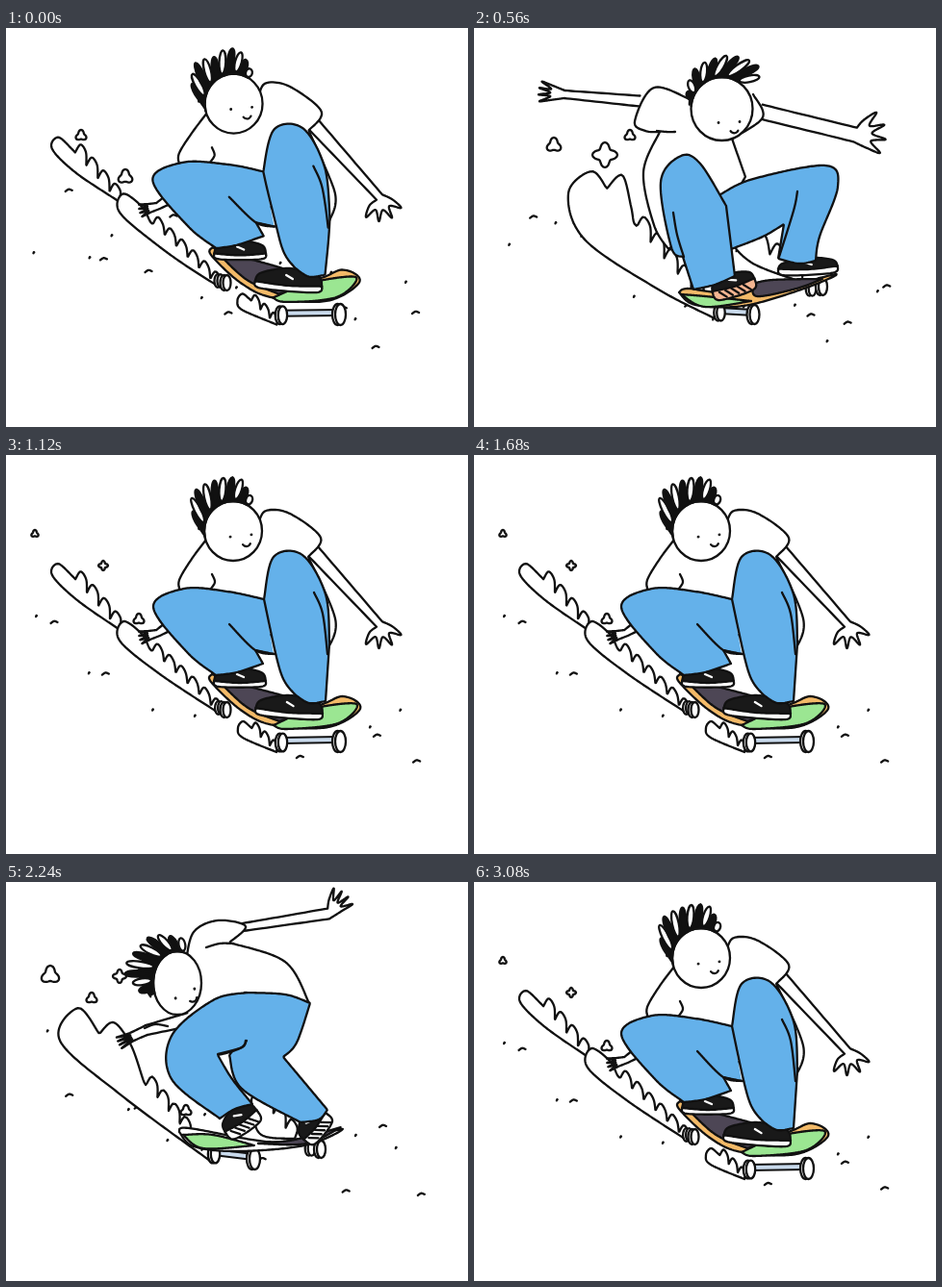
These frames come from a looping animation (480 px wide and 415 px high, 3220 ms). An HTML page with a canvas:

```html
<!DOCTYPE html>
<html lang="en">
<head>
<meta charset="utf-8">
<title>Skater</title>
<style>
html, body { margin: 0; width: 100%; height: 100%; overflow: hidden; background: #fff }
canvas { display: block }
</style>
</head>
<body>
<canvas id="stage" width="480" height="415"></canvas>
<script>
const ctx = document.getElementById('stage').getContext('2d');
const INK = '#111', BLUE = '#64b1ea', ORANGE = '#f3ba68', GREEN = '#9be692';
const STEP = 140, SAMPLES = 200;
const BUMPS = { sprayBack: 4, spray: 6, spraySmall: 3 };
const OUTLINES = ['torso', 'deck', 'grip', 'under', 'legL', 'legR', 'foldA', 'foldB', 'foldC', 'tips'];

// Outlines: a few key points, "!" is a sharp corner, a final "z" closes the line.
// arms: shoulder, wrist, two widths, hand angle, finger length, finger spread
// trucks: far wheel, near wheel, radius. shoes: x, y, length, height, turn, sole
// head: centre, radii, hairline from and to. face: centre, turn
const carveRight = {
  rim: ORANGE, sole: '#fff', front: 'legR', seed: 5,
  sprayBack: '117,181 74,151 48,125 54,113 69,126',
  spray: '222,269 160,228 118,193 122,173 141,186 149,201',
  spraySmall: '281,309 246,294 241,284 246,277 253,282',
  arms: '185,168,158,185,14,7,165,20,50 319,100,388,176,14,8,75,25,130',
  trucks: '222,263,228,265,8 286,299,346,298,11',
  shoes: '243,237,54,15,0,4 294,268,70,18,0.08,5',
  torso: '208,88! 193,108 180,130 181,142! 280,190! 335,201! 342,170 314,106! 327,86 295,61 270,58 262,72',
  deck: '214,228! 213,236 245,266 278,281 335,283 368,264 350,251 310,260 z',
  grip: '217,231! 250,262 284,277! 320,262 250,240 z',
  under: '278,281! 318,264 364,259 345,279 292,285 z',
  legL: '268,150! 230,142 185,139 153,158 188,205 218,229! 240,226 267,217! 259,203! 278,207',
  legR: '268,150 278,106 308,104 332,145 336,196! 332,256! 315,258 300,249! 285,225 268,150',
  foldA: '232,176 259,203 280,207', foldB: '320,143 329,165 334,207', foldC: '214,124 217,132 213,139',
  head: '236,79,30,31,165,300', face: '244,84,-0.1', tips: '193,66 195,38 220,25 243,20 254,42',
  puffs: '30,82,4 101,115,5 138,171,6'
};

const carveLeft = {
  rim: ORANGE, sole: '#f3b591', front: 'legL', seed: 9,
  spray: '250,302 190,271 115,220 98,172 122,149 138,167! 154,153 163,185 166,202',
  spraySmall: '340,264 290,245 268,222 284,215',
  arms: '172,76,94,69,11,8,187,27,60 298,87,396,111,15,15,-5,32,110',
  trucks: '350,271,361,269,9 255,296,290,298,10',
  shoes: '270,269,46,14,-0.3,9 347,251,62,12,-0.05,5',
  torso: '228,76! 187,62 167,97 178,107 193,108! 176,150 187,205 202,230! 260,185 282,155! 268,115! 300,93 290,69',
  deck: '213,275! 230,288 280,289 340,272 377,256 325,268 260,275 222,271 z',
  grip: '290,266! 294,279 335,271 362,261! 310,262 z',
  under: '215,277! 240,290 288,284! 240,279 z',
  legL: '262,185 235,141 215,133 194,160 205,228 217,238! 228,272! 250,267 271,258! 262,185',
  legR: '256,173! 290,157 365,143 378,165 359,217 355,242! 338,245 316,240! 322,204! 300,217 267,230',
  foldA: '336,170 332,190 317,238', foldB: '207,192 211,215 218,238', foldC: '190,107 200,108 209,108',
  head: '257.5,84,32,33,185,300', face: '265,98,-0.05', tips: '222,78 226,45 262,27 298,36 300,50',
  puffs: '83,122,8 136,132,13 162,112,6'
};

const lean = {
  rim: '#fff', sole: '#fff', front: 'legL', seed: 14,
  spray: '212,290 120,222 56,165 75,131 97,158! 112,146 130,170 143,207',
  spraySmall: '300,267 264,262 255,228 262,222',
  arms: '190,143,146,154,14,10,155,32,30 246,47,335,33,8,11,-50,27,75',
  trucks: '316,277,326,278,9 216,283,257,288,11',
  shoes: '245,250,40,17,-0.6,10 322,255,36,18,-0.9,10',
  torso: '190,140! 250,125! 315,126! 290,83 232,63! 249,46 220,40 195,52 187,82',
  deck: '180,260! 195,275 240,280 310,274 350,257 310,266 270,270 190,256 z',
  grip: '262,272! 312,272 348,255! 300,268 z',
  under: '184,263! 205,277 258,274! 215,263 z',
  legL: '250,115! 215,123 172,160 172,205 222,246! 238,236 256,231! 235,205 220,180! 232,177 245,172 250,165',
  legR: '248,115 290,117 316,126! 302,167 288,182! 334,237! 325,247 306,250! 245,215 232,180! 248,160',
  foldA: '249,165 245,172 220,179', foldB: '208,68 222,64 236,64', foldC: '144,152 155,148 168,150',
  head: '178,105,25,33,160,285', face: '186,116,-0.46', tips: '146,122 121,92 145,57 181,56',
  puffs: '46,97,10 89,121,6 118,98,7 187,238,6'
};

const mix = (a, b, k) => a + (b - a) * k;
const mixPoint = (a, b, k) => a.map((v, i) => mix(v, b[i], k));
const polar = (x, y, rx, ry, a) => [x + rx * Math.cos(a), y + ry * Math.sin(a)];
const rad = deg => deg * Math.PI / 180;
const random = seed => () => (seed = seed * 16807 % 2147483647) / 2147483647;
const smooth = p => ({ p }), corner = p => ({ p, sharp: true });
const parse = words => words.map(w => ({ p: w.split(',').map(parseFloat), sharp: w.endsWith('!') }));

function curve(pts, closed) {
  const n = pts.length, at = i => pts[closed ? (i + n) % n : Math.max(0, Math.min(n - 1, i))];
  const line = [at(0).p];
  for (let i = 0; i < (closed ? n : n - 1); i++) {
    const a = at(i), b = at(i + 1);
    const before = a.sharp ? a.p : at(i - 1).p, after = b.sharp ? b.p : at(i + 2).p;
    for (let t = 1 / 16; t <= 1; t += 1 / 16) line.push(a.p.map((q, c) => {
      const p = before[c], r = b.p[c], s = after[c];
      return q + t * (r - p + t * (2 * p - 5 * q + 4 * r - s + t * (3 * (q - r) + s - p))) / 2;
    }));
  }
  return line;
}

// Equal point counts let any two outlines blend.
function resample(line) {
  const dist = [0];
  for (let i = 1; i < line.length; i++)
    dist.push(dist[i - 1] + Math.hypot(line[i][0] - line[i - 1][0], line[i][1] - line[i - 1][1]));
  let j = 1;
  return Array.from({ length: SAMPLES }, (_, i) => {
    const d = dist.at(-1) * i / (SAMPLES - 1);
    while (j < line.length - 1 && dist[j] < d) j++;
    return mixPoint(line[j - 1], line[j], (d - dist[j - 1]) / (dist[j] - dist[j - 1] || 1));
  });
}

// Scalloped crest from the end of the edge back to its start
function crest(edge, bumps) {
  const end = edge[0].p, start = edge.at(-1).p;
  const gap = Math.hypot(end[0] - start[0], end[1] - start[1]) / bumps;
  for (let i = 0; i < bumps; i++) {
    const [x, y] = mixPoint(start, end, (i + .25) / bumps);
    edge.push(corner([x, y]), smooth([x + gap * .3, y - gap * .45]), smooth([x + gap * .62, y]));
  }
  return curve([...edge, smooth(end)]);
}

const mapPose = (pose, fn) => Object.fromEntries(Object.entries(pose).map(([k, v]) =>
  [k, Array.isArray(v) ? fn(k, v) : v]));

function build(pose) {
  const out = {};
  for (const k in pose) {
    if (['rim', 'sole', 'front', 'seed'].includes(k)) { out[k] = pose[k]; continue; }
    const words = pose[k].split(' ');
    const closed = words.at(-1) === 'z' && words.pop();
    if (BUMPS[k]) out[k] = resample(crest(parse(words), BUMPS[k]));
    else if (OUTLINES.includes(k)) out[k] = resample(curve(parse(words), closed));
    else out[k] = words.map(w => w.split(',').map(Number));
  }
  return out;
}

function between(a, b, seed) {
  const out = { ...b, seed };
  for (const k in a) if (Array.isArray(a[k]) && k !== 'puffs') {
    if (b[k]) out[k] = a[k].map((p, i) => mixPoint(p, b[k][i], .5));
  }
  return out;
}

// Hand-drawn line boil
const wobble = (pose, seed, size = .7) => ({ ...mapPose(pose, (k, v) => v.map(([x, y, ...rest]) =>
  [x + size * Math.sin(y / 19 + seed), y + size * Math.sin(x / 23 + seed * 2), ...rest])), seed });

const drift = (pose, dx, dy) => ({ ...pose, puffs: pose.puffs.map(([x, y, s]) => [x + dx, y + dy, s]) });

const A2 = build(carveRight), C = build(carveLeft), D = build(lean);
const A0 = { ...wobble(A2, 3), puffs: [[78, 112, 6], [124, 155, 8]] };
const A1 = drift(wobble(A2, 7), -3, 5);
const B = drift(between(A2, C, 21), -11, 10);
const C1 = drift(wobble(C, 11), -18, 1);
const E = drift(between(A2, D, 25), 5, 6);
const D1 = drift(wobble(D, 17), -13, 5);
const HALF = [A0, A1, A2];
const SEQUENCE = [...HALF, B, C, C1, C, B, A2, A1, ...HALF, E, D, D1, D, E, A2, A1, ...HALF];

function shape(line, fill) {
  if (!line) return;
  ctx.beginPath();
  line.forEach(([x, y]) => ctx.lineTo(x, y));
  if (fill) { ctx.fillStyle = fill; ctx.fill(); }
  ctx.stroke();
}

function oval(x, y, rx, ry, fill, turn = 0) {
  ctx.beginPath();
  ctx.ellipse(x, y, rx, ry, turn, 0, 2 * Math.PI);
  ctx.fillStyle = fill;
  ctx.fill();
  ctx.stroke();
}

function drawDebris({ puffs, seed }) {
  for (const [x, y, s] of puffs) {
    const lobes = 3 + s % 2;
    shape(Array.from({ length: 41 }, (_, i) => {
      const a = i * Math.PI / 20, r = s * (.8 + .2 * Math.cos(lobes * a));
      return [x + r * Math.sin(a), y - r * Math.cos(a)];
    }), '#fff');
  }
  const rand = random(seed * 7919);
  for (let i = 0; i < 20; i++) {
    const x = 25 + 21 * (i + rand()), y = 135 + .3 * x + 95 * rand();
    const w = i % 2 ? 3.5 : .4;
    shape(curve([[x - w, y + 1], [x, y - w / 3], [x + w, y]].map(smooth)));
  }
}

function drawArm([sx, sy, wx, wy, w0, w1, turn, len, spread]) {
  const a = Math.atan2(wy - sy, wx - sx) + Math.PI / 2;
  const side = k => [smooth(polar(sx, sy, k * w0 / 2, k * w0 / 2, a)), corner(polar(wx, wy, k * w1 / 2, k * w1 / 2, a))];
  const fingers = Array.from({ length: 9 }, (_, i) => {
    const r = len * (i % 2 ? 1 : .55);
    return smooth(polar(wx, wy, r, r, rad(turn + spread * (i / 8 - .5))));
  });
  shape(curve([...side(-1), ...fingers, ...side(1).reverse()]), '#fff');
}

function drawTruck([x1, y1, x2, y2, r]) {
  for (const [width, color] of [[8, INK], [4, '#c9daec']]) {
    ctx.lineWidth = width;
    ctx.strokeStyle = color;
    shape([[x1, y1 - 2], [x2, y2 - 2]]);
  }
  ctx.lineWidth = 2.3;
  ctx.strokeStyle = INK;
  for (const [x, y, size] of [[x1, y1, r * .85], [x2, y2, r]])
    for (const dx of [-1.5, 1.5]) oval(x + dx, y, size * .5, size, '#fff');
}

function drawShoe([x, y, w, h, turn, sole], color) {
  const half = w / 2;
  ctx.save();
  ctx.translate(x, y);
  ctx.rotate(turn);
  shape(curve([corner([-half, 0]), smooth([-half * .85, -h * .6]), smooth([0, -h]), smooth([half * .85, -h * .7]), corner([half, 0])]), '#191919');
  shape(curve([corner([-half, -2]), smooth([0, 0]), corner([half, -2]), smooth([half * .8, sole]), smooth([-half * .8, sole])], true), color);
  if (sole > 8) for (let i = -2; i <= 2; i++) shape([[i * w / 7 - 3, 1], [i * w / 7 + 3, sole - 1]]);
  ctx.strokeStyle = '#fff';
  shape([[-3, -h * .6], [4, -h * .4]]);
  ctx.strokeStyle = INK;
  ctx.restore();
}

function drawHead({ head, face, tips, seed }) {
  const [x, y, rx, ry, from, to] = head[0], [fx, fy, turn] = face[0];
  oval(x, y, rx, ry, '#fff');
  ctx.save();
  ctx.translate(fx, fy);
  ctx.rotate(turn);
  for (const side of [-11, 11]) oval(side, 0, .3, .3, INK);
  ctx.beginPath();
  ctx.arc(5, 7, 4.5, .5, 2.6);
  ctx.stroke();
  ctx.restore();

  const rand = random(seed * 104729), count = 11;
  const locks = Array.from({ length: count }, (_, i) => {
    const k = i / (count - 1), base = polar(x, y, rx, ry, rad(mix(from, to, k)));
    return [base, mixPoint(base, tips[Math.round(k * (SAMPLES - 1))], .85 + .15 * rand())];
  });
  shape([...locks.map(([base]) => base), ...locks.map(([base, tip]) => mixPoint(base, tip, .55)).reverse()], INK);
  locks.slice(1).forEach(([[bx, by], [tx, ty]], i) =>
    oval(mix(bx, tx, .55), mix(by, ty, .55), Math.hypot(tx - bx, ty - by) * .45, 3.4, i % 2 ? '#fff' : INK, Math.atan2(ty - by, tx - bx)));
}

function draw(pose) {
  ctx.fillStyle = '#fff';
  ctx.fillRect(0, 0, 480, 415);
  ctx.lineWidth = 2.3;
  ctx.lineCap = ctx.lineJoin = 'round';
  ctx.strokeStyle = INK;
  drawDebris(pose);
  for (const k in BUMPS) shape(pose[k], '#fff');
  pose.arms.forEach(drawArm);
  shape(pose.torso, '#fff');
  pose.trucks.forEach(drawTruck);
  shape(pose.deck, pose.rim);
  shape(pose.grip, '#4d4655');
  shape(pose.under, GREEN);
  drawShoe(pose.shoes[0], pose.sole);
  drawShoe(pose.shoes[1], '#fff');
  shape(pose[pose.front === 'legL' ? 'legR' : 'legL'], BLUE);
  shape(pose[pose.front], BLUE);
  for (const k of ['foldA', 'foldB', 'foldC']) shape(pose[k]);
  drawHead(pose);
}

function tick() {
  draw(SEQUENCE[Math.floor(performance.now() / STEP) % SEQUENCE.length]);
  requestAnimationFrame(tick);
}
tick();
</script>
</body>
</html>
```
